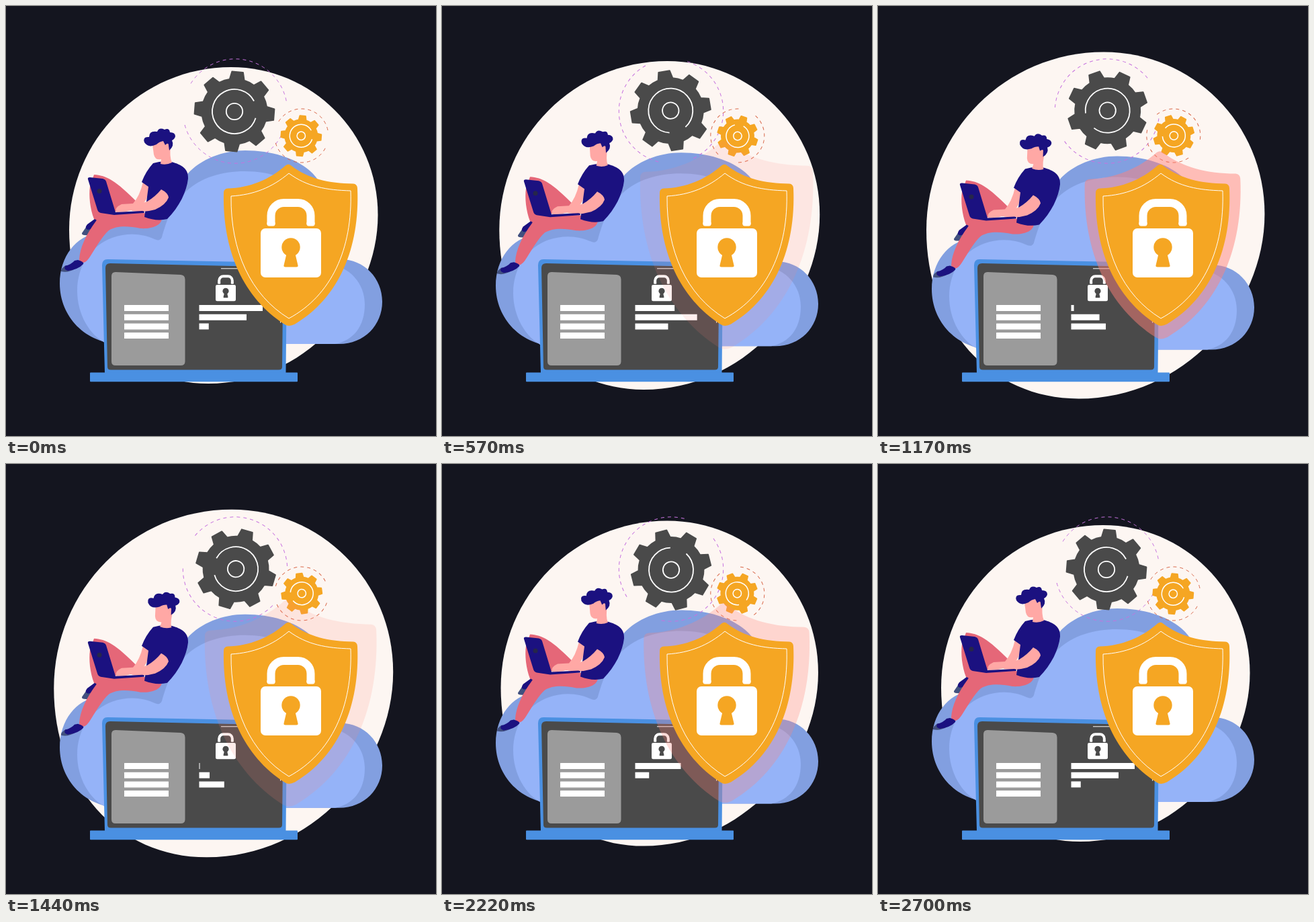
These frames come from a looping animation (640x640 px, 2.73 s). An HTML page with a canvas:

```html
<!DOCTYPE html>
<html lang="en">
<head>
<meta charset="utf-8">
<title>Cloud security</title>
<style>
html, body { margin: 0; width: 100%; height: 100%; overflow: hidden; background: #14151f; }
canvas { display: block; width: 640px; height: 640px; }
</style>
</head>
<body>
<canvas id="stage" width="640" height="640"></canvas>
<script>
const ctx = document.getElementById('stage').getContext('2d');
const TAU = Math.PI * 2;
const STEP = 30, LOOP = 2730, CYCLE = 2700, PULSE = 900;
const NAVY = '#1b1180', SKIN = '#ffa8a5', PINK = '#e56778', SOLE = '#41507f';
const GREY = '#4a4a4a', ORANGE = '#f5a623', BLUE = '#4a90e2', WHITE = '#fff';
const rad = deg => deg * Math.PI / 180;

const shapes = {
  blob: 'M94 333C94 199 202 91 335 91C455 91 553.5 188 553.5 311C553.5 440 442 562 301 562C180 562 94 465 94 333Z',
  cloud: 'M496 503H172C118 503 80 462 80 413C80 372 105 343 135 338C155 318 195 314 232 312C240 288 250 268 270 250C290 228 322 215 356 215C395 215 430 226 452 245C478 267 495 320 498 377C533 377 560 405 560 440C560 475 533 503 496 503Z',
  cloudLight: 'M490 503H151C124 491 106 458 106 424C106 385 128 356 158 345C184 336 205 340 221 347Q229 351 232 344C240 316 247 297 268 276C290 255 322 246 355 246C395 246 428 258 450 285C466 310 478 345 480 384C512 388 534 413 534 444C534 478 516 498 490 503Z',
  shield: 'M416 237.5Q420.500 234 425 238C450 257 480 264 517 264.500Q522.500 265 523 271C527 361 495 435 430 473.500Q421 478 415 474C354 435 322 365 324 278Q324 272 330 271.500C362 271 393 258 416 237.5Z',
  shieldLine: 'M421 249C396 270 369 281 335 283C334 365 364 430 421 465C484 431 516 362 513 275C477 274 448 269 421 249Z',
  frame: 'M151 377L411 382Q418 382 418 390L416.500 546H147L143 386Q143 377 151 377Z',
  screen: 'M155 383L406 388.500Q412.500 389 412.500 396L411 537Q411 541.500 406 541.500H156Q151 541.500 151 537L148 390Q148 383 155 383Z',
  card: 'M163 396L260 400Q266.500 400.500 266.500 407V529Q266.500 535 260 535H163Q157 535 157 529V402Q157 396 163 396Z'
};
for (const key in shapes) shapes[key] = new Path2D(shapes[key]);

const body = [
  [PINK, 'M131 251C149 252 164 260 196 293L188 304L160 306L144 315Q138 323 131 317C125 302 123 282 125 268Z'],
  [SOLE, 'M122 325L113 338Q112 342 124 341Q127 335 134 328Z'],
  [NAVY, 'M132 317Q138 320 136 324Q130 332 122 333Q116 331 121 325Z'],
  [PINK, 'M146 309L205 308Q225 312 232 317C230 328 215 332 200 331C181 327 164 327 153 334C143 343 136 356 127 370Q120 382 115 382Q109 382 109 377C110 360 119 340 134 320Q139 311 146 309Z'],
  [SOLE, 'M89 386Q81 391 82 395Q92 398 105 390Z'],
  [NAVY, 'M107 378Q117 381 115 384Q108 392 92 394Q85 392 88 387Q98 384 102 379Z'],
  [SKIN, 'M204 262L213 268Q212 284 206 292Q195 302 179 306L164 307Q161 300 172 295L189 294Q199 283 204 262Z'],
  [NAVY, 'M219 234Q232 230 246 232C262 236 272 243 271 257C269 276 258 299 240 317Q224 321 206 314L212 269L202 262Q208 246 219 234Z'],
  [SKIN, 'M231 273Q241 278 242 285Q238 296 222 303Q205 308 188 305Q180 300 190 297L210 291Q222 284 231 273Z'],
  [NAVY, 'M122 258Q121 255 125 255L144 257Q148 258 149 261L163 307L203 305Q208 306 205 308L161 311L141 308Q137 307 136 303Z']
];
const head = [
  [SKIN, 'M218 206L238 199L245 205Q243 225 247 233Q239 237 230 235L231 228Q222 230 220 221Z'],
  [NAVY, 'M206 203Q203 194 213 195Q213 185 225 187Q228 180 236 184Q243 181 244 188Q252 188 252 194Q251 198 247 200Q251 208 243 215L242 208Q242 202 237 207L234 201Q228 202 224 206Q212 212 206 203Z']
];
for (const part of [...body, ...head]) part[1] = new Path2D(part[1]);

function fill(path, color) {
  ctx.fillStyle = color;
  ctx.fill(path);
}

function circle(x, y, r, color) {
  ctx.beginPath();
  ctx.arc(x, y, r, 0, TAU);
  ctx.fillStyle = color;
  ctx.fill();
}

function box(x, y, w, h, r, color) {
  ctx.beginPath();
  ctx.roundRect(x, y, w, h, r);
  ctx.fillStyle = color;
  ctx.fill();
}

function strokeArc(r, from, to) {
  ctx.beginPath();
  ctx.arc(0, 0, r, rad(from), rad(to));
  ctx.stroke();
}

function within(draw) {
  ctx.save();
  draw();
  ctx.restore();
}

function scaleAbout(x, y, s) {
  ctx.translate(x, y);
  ctx.scale(s, s);
  ctx.translate(-x, -y);
}

function drawPerson(sway) {
  for (const [color, path] of body) fill(path, color);
  circle(139, 275.500, 3.5, '#26264a');
  within(() => {
    ctx.translate(238, 230);
    ctx.rotate(rad(10.500) * sway);
    ctx.translate(-238, -230);
    for (const [color, path] of head) fill(path, color);
  });
}

function drawGear(x, y, angle, g) {
  within(() => {
    ctx.translate(x, y);
    ctx.rotate(angle);
    ctx.strokeStyle = g.dashColor;
    ctx.lineWidth = 1;
    ctx.setLineDash(g.dash);
    strokeArc(g.orbit, 28, 166);
    strokeArc(g.orbit, 212, 351);
    ctx.setLineDash([]);

    ctx.translate(-g.wobble, g.wobble / 2);
    ctx.beginPath();
    for (let i = 0; i < 8; i++) {
      const mid = -85.500 + i * 45;
      for (const [r, offset] of [[g.root, -13], [g.tip, -8], [g.tip, 8], [g.root, 13]]) {
        const a = rad(mid + offset);
        ctx.lineTo(r * Math.cos(a), r * Math.sin(a));
      }
      ctx.arc(0, 0, g.root, rad(mid + 13), rad(mid + 32));
    }
    ctx.closePath();
    ctx.fillStyle = ctx.strokeStyle = g.color;
    ctx.lineJoin = 'round';
    ctx.lineWidth = 2;
    ctx.fill();
    ctx.stroke();

    ctx.strokeStyle = WHITE;
    ctx.lineWidth = g.line;
    strokeArc(g.hub, 0, 360);
    strokeArc(g.ring, 17, 332);
  });
}

const bigGear = { color: GREY, tip: 59.500, root: 48.500, hub: 12.200, ring: 33, line: 1.8,
  orbit: 77.700, dash: [5, 5], dashColor: '#c772df', wobble: 1 };
const smallGear = { color: ORANGE, tip: 30, root: 24, hub: 6.2, ring: 17, line: 1.5,
  orbit: 40, dash: [5, 5], dashColor: '#d9694b', wobble: 0.5 };

// Padlock in the coordinates of the large one, centred on x = 0, body top at y = 0.
function drawLock(x, y, s, hole) {
  within(() => {
    ctx.translate(x, y);
    ctx.scale(s, s);
    ctx.beginPath();
    ctx.moveTo(-29.500, -6);
    ctx.lineTo(-29.500, -17);
    ctx.arcTo(-29.500, -38, -8, -38, 19);
    ctx.lineTo(8, -38);
    ctx.arcTo(29.500, -38, 29.500, -17, 19);
    ctx.lineTo(29.500, -6);
    ctx.strokeStyle = WHITE;
    ctx.lineWidth = 12;
    ctx.stroke();
    box(-35.500, -9, 12, 5.500, [0, 0, 3, 3], WHITE);
    box(23.500, -9, 12, 5.500, [0, 0, 3, 3], WHITE);
    box(-45, 0, 90, 73, 7, WHITE);
    circle(0, 28, 13.700, hole);
    fill(new Path2D('M-6 36H6L10.500 55Q11 57.500 8 57.500H-8Q-11 57.500 -10.500 55Z'), hole);
  });
}

function drawLaptop(theta) {
  fill(shapes.frame, BLUE);
  fill(shapes.screen, GREY);
  fill(shapes.card, '#9b9b9b');
  box(125, 545.500, 309, 13.700, 1, BLUE);
  for (let i = 0; i < 4; i++) box(176, 445 + i * 13.700, 66, 9, 0.5, WHITE);
  [94.500, 94, 57].forEach((full, i) => {
    const w = full * (1 + Math.cos(theta - i * Math.PI / 3)) / 2;
    if (w > 0.1) box(287.500, 445 + i * 13.700, w, 9, 0, WHITE);
  });
  box(320, 390.300, 30, 1, 0, WHITE);
  box(408, 462, 1, 9.500, 0, WHITE);
  drawLock(327, 415, 1 / 3, GREY);
}

function drawShield(t) {
  const rest = 1 - (t % PULSE) / PULSE;
  within(() => {
    ctx.globalAlpha = rest * rest;
    scaleAbout(423.500, 356, 0.98 + 0.36 * (1 - rest * rest));
    fill(shapes.shield, '#ff8079');
  });
  fill(shapes.shield, ORANGE);
  ctx.strokeStyle = WHITE;
  ctx.lineWidth = 1;
  ctx.stroke(shapes.shieldLine);
  drawLock(424, 331, 1, ORANGE);
}

function render(t) {
  const theta = TAU * t / CYCLE;
  const sway = (1 - Math.cos(theta)) / 2;
  ctx.fillStyle = '#14151f';
  ctx.fillRect(0, 0, 640, 640);

  within(() => {
    scaleAbout(324, 326.500, 1 + 0.1 * sway);
    fill(shapes.blob, '#fdf6f2');
  });
  within(() => {
    ctx.translate(0, 8.8 * sway);
    fill(shapes.cloud, '#829fe0');
    fill(shapes.cloudLight, '#95b3f8');
    drawPerson(sway);
  });
  drawGear(341, 156.500, theta, bigGear);
  drawGear(439.800, 193, -theta, smallGear);
  drawLaptop(theta);
  drawShield(t);
}

const start = performance.now();
function tick() {
  const elapsed = (performance.now() - start) % LOOP;
  render(Math.floor(elapsed / STEP) * STEP);
  requestAnimationFrame(tick);
}
tick();
</script>
</body>
</html>
```
